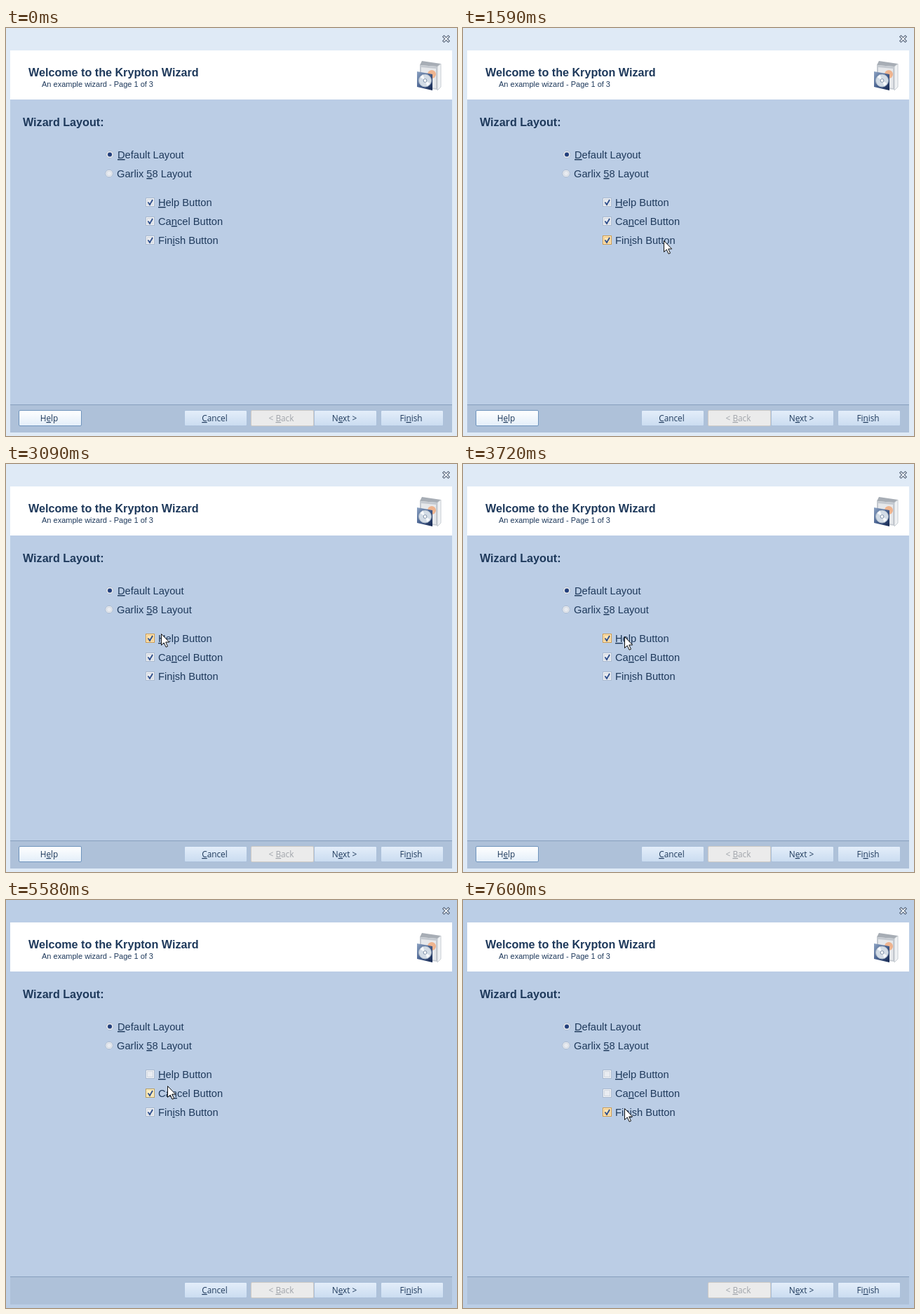
An HTML page that plays this animation: 643x582 px, repeating every 8 s.

```html
<!DOCTYPE html>
<html lang="en">
<head>
<meta charset="utf-8">
<title>Wizard</title>
<style>
html, body { margin: 0; width: 100%; height: 100%; overflow: hidden; }
svg { display: block; width: 643px; height: 582px; }
text { font-family: "Liberation Sans", Arial, sans-serif; font-size: 14.667px; fill: #1e395b; white-space: pre; }
text.head { font-size: 16.15px; font-weight: bold; }
text.sub { font-size: 11px; }
.key { text-decoration: underline; text-decoration-skip-ink: none; }
.button text { font: 11.8px "Open Sans", "Noto Sans", sans-serif; text-anchor: middle; }
.button rect { fill: url(#normal); stroke: #abc0da; }
.button.default rect { fill: url(#default); stroke: #6f94bd; }
.button.disabled rect { fill: #ebebeb; stroke: #cdcac6; }
.button.disabled text { fill: #a0a4aa; }
.button.hover rect { fill: url(#hot); stroke: #c9a254; }
.box { fill: #f4f6f9; stroke: #abbacf; }
.inner { fill: #e9ecf1; stroke: #d0d6df; }
.tick { fill: none; stroke: #2c4d8a; stroke-width: 1.8; }
.off .tick { display: none; }
.hover .box { fill: #fcf3cf; stroke: #b99d5c; }
.hover .inner { fill: #fdf0c8; stroke: #f3dda2; }
.hover.strong .box { fill: #fdeecb; stroke: #d09a48; }
.hover.strong .inner { fill: #fde6b8; stroke: #f5c67c; }
.close { fill: none; stroke-linecap: square; }
</style>
</head>
<body>
<svg id="stage" viewBox="0 0 643 582">
  <defs>
    <linearGradient id="normal" x2="0" y2="1"><stop stop-color="#e4eefa"/><stop offset="1" stop-color="#cadcf0"/></linearGradient>
    <linearGradient id="default" x2="0" y2="1"><stop stop-color="#fff"/><stop offset="1" stop-color="#e3eef9"/></linearGradient>
    <linearGradient id="hot" x2="0" y2="1"><stop stop-color="#fef3cd"/><stop offset="1" stop-color="#fbdb84"/></linearGradient>
    <linearGradient id="cover" x2="1" y2="1"><stop stop-color="#8fa5c4"/><stop offset=".5" stop-color="#46608f"/><stop offset="1" stop-color="#14264f"/></linearGradient>
  </defs>
  <rect id="frame" width="643" height="582"/>
  <path fill="#fff" d="M6 32h630v70H6z"/>
  <path fill="#bbcde5" d="M6 102h630v435H6z"/>
  <path fill="#aec1d9" d="M6 538h630v39H6z"/>
  <path fill="#879fbd" d="M6 537h630v1H6z"/>
  <g class="close">
    <path stroke="#44536a" stroke-width="3.6" d="M624.5 12.5l6 6m0-6l-6 6"/>
    <path stroke="#f4f8fc" stroke-width="1.7" d="M624.5 12.5l6 6m0-6l-6 6"/>
  </g>
  <text class="head" x="32" y="69">Welcome to the Krypton Wizard</text>
  <text class="sub" x="51" y="84">An example wizard - Page 1 of 3</text>
  <text class="head" x="24" y="140">Wizard Layout:</text>
  <g id="icon">
    <path fill="#a7adb5" d="M590 53l3-6 27 4-5 4z"/>
    <path fill="#c4c9d0" d="M590 53l25 2v33l-25-4z"/>
    <path fill="#e6e8eb" d="M592 56l21 2v28l-21-3z"/>
    <path fill="#f0f2f4" stroke="#bcc2c9" stroke-width=".8" d="M615 55l5-4v33l-5 5z"/>
    <circle cx="607" cy="66" r="6" fill="#eeb48f"/>
    <path fill="url(#cover)" d="M586 62l22 4v23l-22-5z"/>
    <circle cx="597.5" cy="75" r="9" fill="#d3dce6" stroke="#a9b6c6"/>
    <path fill="#f7f9fb" d="M597.5 75l-7-5 4-3.5zm0 0l7 4-4 4z"/>
    <circle cx="597.5" cy="75" r="2.4" fill="#fff" stroke="#7f91a9"/>
  </g>
  <g id="controls"></g>
  <circle id="click" cx="229.5" r="12" fill="#e8e83c" opacity=".7"/>
  <path id="cursor" fill="#fff" stroke="#111" d="M.5.5v16l3.7-3.5 2.9 6.2 2.4-1.1-2.8-6h5z"/>
</svg>
<script>
const $ = id => document.getElementById(id);
// An underscore precedes the underlined access key.
const label = s => s.replace(/_(.)/, '<tspan class="key">$1</tspan>');

const radio = (id, x, y, s, on) => `<g id="${id}">
  <circle class="box" cx="${x}" cy="${y}" r="5.2"/>
  <circle class="inner" cx="${x}" cy="${y}" r="3.5"/>
  ${on ? `<circle cx="${x}" cy="${y}" r="3" fill="#223f7c"/>` : ''}
  <text x="${x + 11}" y="${y + 5.5}">${label(s)}</text></g>`;

const check = (id, y, s) => `<g id="${id}">
  <rect class="box" x="199.5" y="${y - 6.5}" width="12" height="12"/>
  <rect class="inner" x="201.5" y="${y - 4.5}" width="8" height="8"/>
  <path class="tick" d="M202.5 ${y - .5}l2.5 3.5 4-7"/>
  <text x="217" y="${y + 5}">${label(s)}</text></g>`;

const button = (id, x, s, type = '') => `<g id="${id}" class="button ${type}">
  <rect x="${x + .5}" y="545.5" width="89" height="22" rx="1.5"/>
  <text x="${x + 43.5}" y="561">${label(s)}</text></g>`;

$('controls').innerHTML =
  radio('r1', 148, 180.5, '_Default Layout', true) +
  radio('r2', 147, 207.5, 'Garlix _58 Layout') +
  check('c1', 249, '_Help Button') +
  check('c2', 276, 'Ca_ncel Button') +
  check('c3', 303, 'Fin_ish Button') +
  button('help', 18, 'H_elp', 'default') +
  button('cancel', 254, '_Cancel') +
  button('back', 349, '&lt; _Back', 'disabled') +
  button('next', 439, 'N_ext &gt;') +
  button('finish', 534, 'Fi_nish');

// Hover areas: id, left, right, top, bottom
const areas = [
  ['r1', 141, 256, 170, 191], ['r2', 141, 268, 197, 219],
  ['c1', 199, 296, 238, 260], ['c2', 199, 312, 265, 287], ['c3', 199, 305, 292, 314],
  ['next', 440, 528, 545, 568], ['finish', 534, 624, 545, 568]
];
// Pointer path: time, x, y
const path = [
  [460, 588, 577], [950, 411, 447], [1240, 334, 362], [2080, 218, 220], [2220, 208, 211],
  [2810, 208, 211], [3300, 230, 266], [3440, 230, 266], [3720, 230, 246],
  [5300, 230, 246], [5580, 230, 265], [7110, 230, 265], [7600, 230, 297], [8000, 230, 297]
];
const STEP = 70, LOOP = 8000;

function pointer(t) {
  const i = path.findIndex(p => t < p[0]);
  const [t0, x0, y0] = path[i - 1], [t1, x1, y1] = path[i];
  const u = Math.floor((t - t0) / STEP) * STEP / (t1 - t0);
  return [Math.round(x0 + (x1 - x0) * u), Math.round(y0 + (y1 - y0) * u)];
}

const show = (id, on) => $(id).style.display = on ? '' : 'none';

function draw(t) {
  const [x, y] = t < 460 ? [-99, -99] : pointer(t);
  const press1 = t >= 4360 && t < 4640, press2 = t >= 6440 && t < 6650;
  $('cursor').setAttribute('transform', `translate(${x} ${y})`);
  $('frame').setAttribute('fill', t < 4360 ? '#dfeaf6' : '#bbcee6');
  for (const [id, l, r, top, bottom] of areas)
    $(id).classList.toggle('hover', x >= l && x <= r && y >= top && y <= bottom);
  $('c1').classList.add('strong');
  $('c3').classList.add('strong');
  $('c2').classList.toggle('strong', press2);
  $('c1').classList.toggle('off', t >= 4640);
  $('c2').classList.toggle('off', t >= 6650);
  show('help', t < 4640);
  show('cancel', t < 6650);
  show('click', press1 || press2);
  $('click').setAttribute('cy', y + 1);
}

const start = performance.now();
(function tick() {
  draw((performance.now() - start) % LOOP);
  requestAnimationFrame(tick);
})();
</script>
</body>
</html>
```
